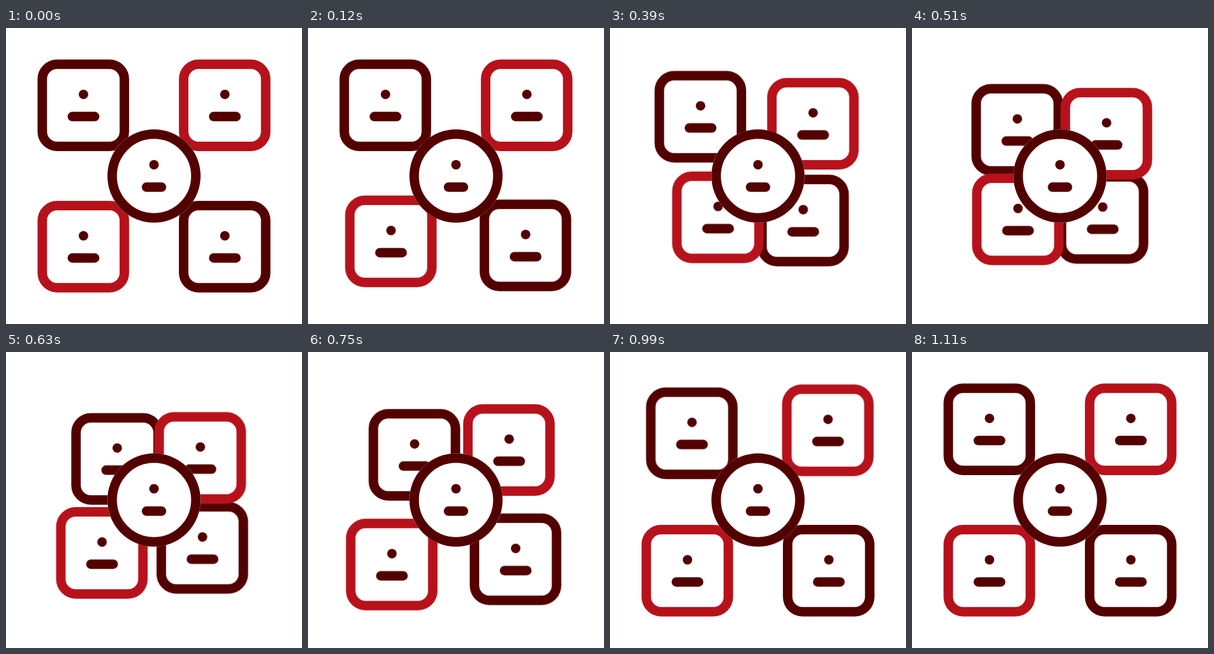
Animation of 500x500 px, one loop 1500 ms. Source, as an HTML page without scripts:

```html
<!DOCTYPE html>
<html lang="en">
<head>
<meta charset="utf-8">
<title>People gathering</title>
<style>
  html, body { margin: 0; width: 100%; height: 100%; overflow: hidden; background: #fff; }
  svg { display: block; width: 100%; height: 100%; }

  .frame { fill: #fff; stroke: currentColor; stroke-width: 16; }
  .dark { color: #530000; }
  .red { color: #b7121b; }
  .dot { fill: #530000; }
  .bar { stroke: #530000; stroke-width: 16; stroke-linecap: round; }

  .card {
    animation: gather 1500ms var(--delay) infinite;
    animation-timing-function: cubic-bezier(.4, 0, .6, 1);
  }
  .tl { --x: 57px; --y: 50px; --delay: 210ms; }
  .tr { --x: -42.9px; --y: 50px; --delay: 150ms; }
  .br { --x: -48px; --y: -49px; --delay: 60ms; }
  .bl { --x: 52.2px; --y: -50.1px; --delay: 0ms; }

  @keyframes gather {
    0%, 60%, 100% { transform: translate(0, 0); }
    28% { transform: translate(var(--x), var(--y)); }
  }
</style>
</head>
<body>
<svg viewBox="0 0 500 500">
  <defs>
    <g id="card">
      <rect class="frame" x="-69.3" y="-69.3" width="138.6" height="138.6" rx="25"/>
      <circle class="dot" cx=".3" cy="-18.4" r="8"/>
      <path class="bar" d="M-18.5 19H19.1"/>
    </g>
  </defs>

  <g class="card dark tl"><use href="#card" x="130.6" y="130.6"/></g>
  <g class="card dark br"><use href="#card" x="369.4" y="369.4"/></g>
  <g class="card red tr"><use href="#card" x="369.4" y="130.6"/></g>
  <g class="card red bl"><use href="#card" x="130.6" y="369.4"/></g>

  <g class="dark">
    <circle cx="250" cy="250" r="78.8" fill="#fff"/>
    <circle class="frame" cx="250" cy="250" r="70.7"/>
    <circle class="dot" cx="250" cy="231" r="8"/>
    <path class="bar" d="M237.4 268.8H262.6"/>
  </g>
</svg>
</body>
</html>
```
